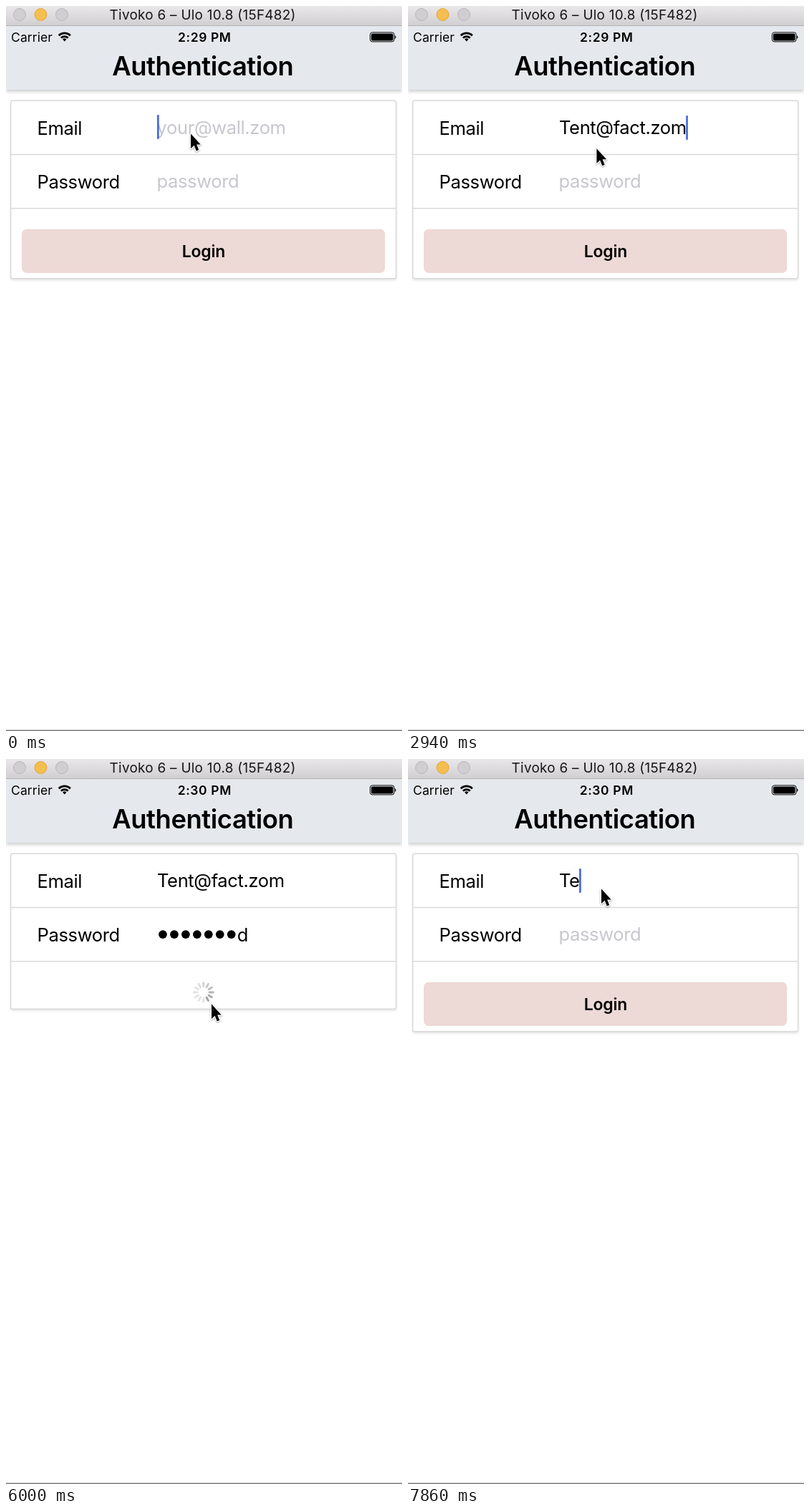
These frames come from a looping animation (553x1013 px, 8000 ms). An HTML page:

```html
<!DOCTYPE html>
<html lang="en">
<head>
<meta charset="utf-8">
<title>Authentication</title>
<style>
  html, body { margin: 0; width: 100%; height: 100%; overflow: hidden; background: #fff; }
  svg { display: block; width: 553px; height: 1013px; }
  text { font-family: Inter, "Liberation Sans", sans-serif; font-optical-sizing: none; white-space: pre; }
  .field { font-size: 25.6px; letter-spacing: -.4px; }
  .hint { fill: #c7c7cd; }
  .semi { font-weight: 600; }
  .mid { text-anchor: middle; }
  .button { font-size: 23px; letter-spacing: -.25px; }
  .status { font-size: 17.5px; }
</style>
</head>
<body>
<svg viewBox="0 0 553 1013" xmlns="http://www.w3.org/2000/svg">
  <defs>
    <linearGradient id="chrome" x1="0" y1="0" x2="0" y2="1">
      <stop offset="0" stop-color="#e9e7e9"/>
      <stop offset="1" stop-color="#d1cfd1"/>
    </linearGradient>
  </defs>
  <rect width="553" height="1013" fill="#fff"/>

  <rect y="28" width="553" height="89" fill="#e5e9ee" style="filter:drop-shadow(0 3px 2px rgba(0,0,0,.18))"/>
  <rect width="553" height="27" fill="url(#chrome)"/>
  <rect y="27" width="553" height="1" fill="#b3b1b3"/>
  <g fill="#d0ced0" stroke="#b9b7b9">
    <circle cx="19" cy="12" r="8.5"/>
    <circle cx="48.5" cy="12" r="8.5" fill="#f6be4f" stroke="#dfa941"/>
    <circle cx="78" cy="12" r="8.5"/>
  </g>
  <text class="mid" x="274.7" y="19.3" font-size="18.9" letter-spacing=".28" fill="#161616">Tivoko 6 – Ulo 10.8 (15F482)</text>

  <text class="status" x="7" y="49.5" letter-spacing=".1">Carrier</text>
  <g fill="none" stroke="#000" stroke-width="2.6">
    <path d="M73.7 41.2a11.6 11.6 0 0 1 16.2 0M76.8 44.6a7.2 7.2 0 0 1 10 0"/>
    <path d="M81.8 49.6l-2.7-3a3.8 3.8 0 0 1 5.4 0z" fill="#000" stroke="none"/>
  </g>
  <text id="clock" class="status semi mid" x="277.3" y="49.5" letter-spacing=".6"></text>
  <rect x="508.5" y="36.9" width="33.6" height="13" rx="3" fill="none" stroke="#000"/>
  <rect x="510" y="38.4" width="30.6" height="10" rx="1.6"/>
  <path d="M543.2 41v5a3 3 0 0 0 0-5z"/>
  <text class="semi mid" x="274.8" y="97" font-size="36.4" letter-spacing="-.45">Authentication</text>

  <rect id="card" x="6.7" y="132.3" width="538" rx="2.5" fill="#fff" stroke="#d9d9d9" stroke-width="1.4"
        style="filter:drop-shadow(0 2.5px 1.5px rgba(0,0,0,.1))"/>
  <g id="form">
    <path d="M7 207.6H545M7 282.7H545" stroke="#dadada" stroke-width="1.5"/>
    <text class="field" x="43.5" y="180">Email</text>
    <text class="field" x="43.5" y="255.3">Password</text>
    <text id="emailHint" class="field hint" x="210.5" y="178.6">your@wall.zom</text>
    <text id="passHint" class="field hint" x="210.5" y="253.9">password</text>
    <text id="email" class="field" x="211"></text>
    <g id="dots"></g>
    <text id="lastChar" class="field" y="254.6"></text>
    <rect id="caret" width="2.7" height="34" rx="1" fill="#4669e0"/>
  </g>
  <g id="button">
    <rect x="22" width="507.3" height="61.3" rx="7" fill="#edd9d6"/>
    <text class="button semi mid" x="275.9" y="38.9"></text>
  </g>
  <g id="spinner" transform="translate(275.8 326)" stroke="#8f8f8f" stroke-width="2.9" stroke-linecap="round"></g>

  <rect y="1011.5" width="553" height="1.5" fill="#7b7b7b"/>
  <path id="pointer" d="M0 .5V21L4.7 16.8 7.8 24.4 11.2 23 8.2 15.5H13.8Z" stroke="#fff" stroke-width="2.4"
        stroke-linejoin="round" paint-order="stroke" style="filter:drop-shadow(0 1.5px 1.2px rgba(0,0,0,.35))"/>
</svg>
<script>
const LOOP = 8000, TICK = 60;
const EMAIL = "Tent@fact.zom", SECRET = "password";
const EMAIL_KEYS = [840, 900, 1080, 1260, 1440, 1500, 1560, 1740, 1860, 2160, 2400, 2460, 2580];
const RETYPE_KEYS = [7800, 7860];
const SECRET_KEYS = [3780, 4020, 4140, 4260, 4440, 4560, 4740, 4860];
const SPIN_AT = 5640, SIGNED_IN = 6060, SIGNED_OUT = 6960;
const FIELD_X = 211, DOT_STEP = 15.95;

// time, x, y of the pointer tip
const PATH = [
  [0, 258, 178], [2820, 258, 178], [3180, 279, 258], [3300, 279, 250],
  [5160, 279, 250], [5400, 287, 342], [6300, 287, 342], [6780, 303, 193],
  [7080, 303, 193], [7440, 270, 181], [LOOP, 270, 181]
];

const $ = id => document.getElementById(id);
const set = (el, attrs) => { for (const k in attrs) el.setAttribute(k, attrs[k]); };
const show = (el, on) => set(el, { visibility: on ? "visible" : "hidden" });
const ramp = (t, from, to) => Math.min(1, Math.max(0, (t - from) / (to - from)));
const ease = p => p * p * (3 - 2 * p);
const typed = (keys, t) => keys.filter(k => k <= t).length;

function add(parent, tag, attrs) {
  const el = document.createElementNS("http://www.w3.org/2000/svg", tag);
  set(el, attrs);
  return parent.appendChild(el);
}

const dots = SECRET.split("").map((_, i) =>
  add($("dots"), "circle", { cx: 219 + i * DOT_STEP, cy: 245.1, r: 5.9 }));
const spokes = Array.from({ length: 12 }, (_, i) =>
  add($("spinner"), "path", { d: "M0-8.4V-13.4", transform: `rotate(${i * 30})` }));
const [buttonBox, buttonText] = $("button").children;

function drawPointer(t) {
  const i = PATH.findIndex(p => p[0] > t);
  const [t0, x0, y0] = PATH[i - 1], [t1, x1, y1] = PATH[i];
  const p = ease(ramp(t, t0, t1));
  set($("pointer"), { transform: `translate(${x0 + (x1 - x0) * p} ${y0 + (y1 - y0) * p})` });
}

function caretAlpha(t) {
  if (t < 840) return 1 - ramp(t, 0, 240) + ramp(t, 360, 600);
  if (t < 3780) return 1 - ramp(t, 3540, 3780);
  if (t < SIGNED_OUT) return 1 - ramp(t, 5160, 5400);
  return 1;
}

function drawForm(t) {
  const again = t >= SIGNED_OUT;
  const inEmail = t < 3300 || t >= 7500;
  const inSecret = t >= 3300 && t < 5400;
  const mail = EMAIL.slice(0, typed(again ? RETYPE_KEYS : EMAIL_KEYS, t));
  const count = again ? 0 : typed(SECRET_KEYS, t);
  const hidden = Math.max(0, count - 1);

  $("email").textContent = mail;
  set($("email"), { y: inEmail ? 179.4 : 178.6 });
  show($("emailHint"), !mail);
  show($("passHint"), !count);
  dots.forEach((dot, i) => show(dot, i < hidden));
  const lastX = FIELD_X + hidden * DOT_STEP;
  $("lastChar").textContent = SECRET.slice(hidden, count);
  set($("lastChar"), { x: lastX });

  const end = inEmail
    ? FIELD_X + (mail ? $("email").getComputedTextLength() - .6 : 0)
    : lastX + (count ? $("lastChar").getComputedTextLength() - .6 : 0);
  const top = inEmail ? 152 + (mail ? 1 : 0) : 227.3 + (count ? 1 : 0);
  set($("caret"), { x: end, y: top, opacity: inEmail || inSecret ? caretAlpha(t) : 0 });
}

function drawButton(t, signedIn) {
  const press = signedIn ? ramp(t, 6720, 6900) : t < SPIN_AT ? ramp(t, 5430, 5580) : 0;
  set($("button"), { transform: `translate(0 ${signedIn ? 140 : 311.7})`, opacity: 1 - .8 * press });
  buttonText.textContent = signedIn ? "Log out" : "Login";
}

function drawSpinner(t) {
  const head = 5 + Math.floor((t - 6000) * 12 / 1000);
  spokes.forEach((spoke, i) => {
    const age = (((head - i) % 12) + 12) % 12;
    set(spoke, { opacity: Math.max(.24, .85 - age * .09) });
  });
}

function draw(time) {
  const t = Math.floor((time % LOOP) / TICK) * TICK;
  const loading = t >= SPIN_AT && t < SIGNED_IN;
  const signedIn = t >= SIGNED_IN && t < SIGNED_OUT;

  $("clock").textContent = t < 3120 ? "2:29 PM" : "2:30 PM";
  set($("card"), { height: (signedIn ? 209.4 : loading ? 349.2 : 380.7) - 132.3 });
  set($("form"), { display: signedIn ? "none" : "inline" });
  set($("button"), { display: loading ? "none" : "inline" });
  set($("spinner"), { display: loading ? "inline" : "none" });
  if (!signedIn) drawForm(t);
  if (loading) drawSpinner(t); else drawButton(t, signedIn);
  drawPointer(t);
}

let start;
function frame(now) {
  start ??= now;
  draw(Math.max(0, now - start));
  requestAnimationFrame(frame);
}
draw(0);
requestAnimationFrame(frame);
</script>
</body>
</html>
```
